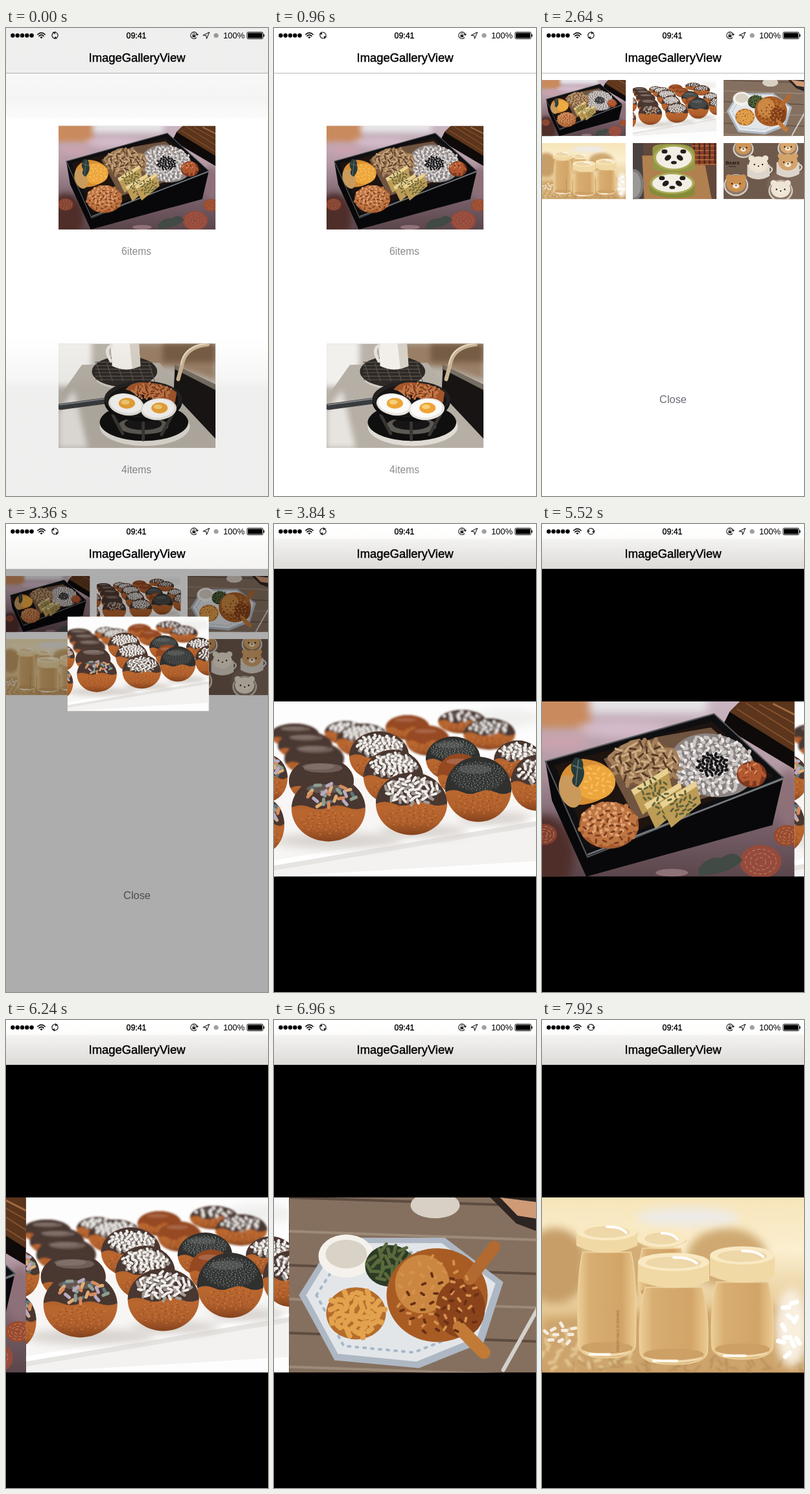
These frames come from a looping animation (404x720 px, 8 s). An HTML page:

```html
<!DOCTYPE html>
<html lang="en">
<head>
<meta charset="utf-8">
<title>ImageGalleryView</title>
<style>
html, body { margin: 0; width: 100%; height: 100%; overflow: hidden; background: #fff; }
svg { display: block; width: 100%; height: 100%; }
text { font-family: "Liberation Sans", Arial, sans-serif; text-anchor: middle; }
</style>
</head>
<body>
<svg id="stage" viewBox="0 0 404 720"></svg>
<script>
const LOOP = 8000, W = 404, H = 269;
let seed = 7;
const rnd = () => (seed = (seed * 16807) % 2147483647) / 2147483647;
const n1 = v => Math.round(v * 10) / 10;

// Shape helpers
const E = (x, y, rx, ry, fill, more = '') =>
  `<ellipse cx="${x}" cy="${y}" rx="${rx}" ry="${ry}" fill="${fill}" ${more}/>`;
const R = (x, y, w, h, fill, more = '') =>
  `<rect x="${x}" y="${y}" width="${w}" height="${h}" fill="${fill}" ${more}/>`;
const P = (d, fill, more = '') => `<path d="${d}" fill="${fill}" ${more}/>`;
const L = (d, stroke, w = 1, more = '') =>
  `<path d="${d}" fill="none" stroke="${stroke}" stroke-width="${w}" stroke-linecap="round" ${more}/>`;
const T = (x, y, size, text, fill = '#000', more = '') =>
  `<text x="${x}" y="${y}" font-size="${size}" fill="${fill}" ${more}>${text}</text>`;
const soft = 'filter="url(#soft)"';
const haze = s => `<g filter="url(#haze)">${s}</g>`;
const turn = (a, x, y) => `transform="rotate(${a} ${x} ${y})"`;
const grad = (id, stops, dir = 'x2="0" y2="1"') => `<linearGradient id="${id}" ${dir}>` +
  stops.map(([o, c, a = 1]) => `<stop offset="${o}" stop-color="${c}" stop-opacity="${a}"/>`).join('') +
  '</linearGradient>';

// Short strokes spread over an ellipse along a jittered spiral
function specks(n, cx, cy, rx, ry, len, color, w) {
  let d = '';
  const turn0 = rnd() * 6.283;
  for (let i = 0; i < n; i++) {
    const a = turn0 + i * 2.4, r = Math.sqrt((i + rnd()) / n), b = rnd() * 6.283;
    const u = Math.cos(b) * len, v = Math.sin(b) * len;
    d += `M${n1(cx + Math.cos(a) * r * rx - u / 2)} ${n1(cy + Math.sin(a) * r * ry - v / 2)}l${n1(u)} ${n1(v)}`;
  }
  return L(d, color, w);
}

function donut(x, y, rx, ry, cap, h = 0) {
  let s = E(x, y, rx, ry, 'url(#dough)') +
    specks(rx, x, y + ry * .45, rx * .75, ry * .42, 2.5, '#974a20', 1.1) +
    specks(rx * .6, x, y + ry * .4, rx * .75, ry * .4, 2, '#d28248', 1.1);
  if (cap) {
    const k = rx * Math.sqrt(1 - h * h), b = y + h * ry, q = k / 2;
    s += P(`M${x - k} ${b}A${rx} ${ry} 0 ${h > 0 ? 1 : 0} 1 ${x + k} ${b}` +
      `q${-q / 2} 6 ${-q} 0t${-q} 0t${-q} 0t${-q} 0Z`, cap) +
      E(x - rx * .1, y - ry * .62, rx * .5, ry * .14, '#fff', 'opacity=".16"');
  }
  return s;
}

function bento() {
  let s = R(0, 0, W, H, 'url(#cloth)') +
    R(-10, -10, 100, 52, '#c98a5d', soft) + R(90, -15, 180, 32, '#e6e4e7', soft) +
    E(140, 42, 70, 12, '#d6bccb', soft) + E(45, 62, 40, 12, '#cba3ae', soft) +
    E(20, 235, 45, 60, '#4f2f2c', soft) + E(395, 150, 20, 45, '#8d6f78', soft);
  const flower = (x, y, r, c) => E(x, y, r, r * .8, c) +
    [.75, .5, .25].map(k => E(x, y, r * k, r * .8 * k, 'none', 'stroke="#b98368" stroke-width="1" stroke-dasharray="5 3"')).join('');
  s += flower(18, 204, 20, '#84402f') + flower(352, 246, 32, '#964a3b') + flower(392, 206, 20, '#9a4a2d') +
    P('M256 258q10-20 36-18q20-14 32 4q-12 12-30 18l-36 7z', '#414a45') + E(215, 263, 25, 6, '#8f7178');
  s += P('M293 38L304 16L318 2H404V104Z', '#0d0a09') + P('M304 16L320 0H404V78Z', '#5b351c') +
    L('M330 3L404 50M350 4L404 34M316 12L402 66', '#84512c', 2) + L('M372 4L404 20', '#a06a40', 3);
  s += P('M20 92L30 152L83 269L370 190L387 117L85 239Z', '#08080a') +
    P('M20 92L280 19L387 117L85 239Z', '#0f0f11', 'stroke="#55585b" stroke-width="2" stroke-linejoin="round"') +
    P('M34 98L276 31L371 115L91 226Z', '#1e1410') +
    L('M86 235L386 119', '#777c80', 2.5);
  s += P('M110 88L190 55L275 40L355 108L330 128L160 182Z', '#6f5440') +
    E(278, 98, 66, 48, '#8d8583', turn(12, 278, 98)) + specks(120, 278, 98, 64, 46, 4, '#cbc6c4', 5.5) +
    specks(60, 278, 98, 62, 44, 3.5, '#efedec', 4) + specks(60, 278, 98, 62, 44, 3, '#77706e', 2) +
    specks(40, 278, 97, 24, 18, 3, '#17161a', 4);
  s += E(172, 95, 54, 36, '#7a583c') + specks(70, 172, 94, 54, 34, 12, '#a47f5a', 6) +
    specks(40, 172, 92, 50, 30, 10, '#cbab82', 3.5) + specks(26, 172, 95, 50, 30, 9, '#553926', 3);
  s += P('M42 122q4-26 36-34q42 4 50 32q-4 30-46 38q-28 6-40-36z', '#d88f34') + E(96, 124, 32, 27, '#eda63c') +
    E(58, 138, 16, 26, '#c99a5c', turn(-20, 58, 138)) + specks(20, 98, 122, 26, 22, 5, '#f8bf60', 2.5) +
    P('M66 86q14 0 12 15q6 14-8 31q-14-6-6-18q-10-14 2-28z', '#273b3b') + L('M71 90l-4 38M62 98l14 5', '#64796f', 1.5);
  s += E(118, 190, 46, 36, '#a35a30') + specks(80, 118, 189, 44, 33, 4, '#bf7642', 7) +
    specks(40, 114, 182, 38, 27, 3, '#dfa373', 4.5) + specks(30, 120, 194, 40, 28, 5, '#7f3d20', 3);
  const egg = (x, y) => `<g transform="translate(${x} ${y})">` +
    P('M0 34L56 0L64 34L18 72Z', '#bd9c56') + P('M0 34L56 0L58 8L5 42Z', '#e9d193') +
    specks(22, 35, 35, 22, 20, 5, '#5f6138', 3) + '</g>';
  s += egg(152, 102) + egg(172, 124) + egg(196, 122);
  return s + E(338, 112, 23, 20, '#7d3822') + specks(24, 338, 110, 20, 16, 7, '#b4592f', 5) + specks(6, 334, 104, 15, 10, 5, '#dc9270', 2);
}

function donuts() {
  const choc = '#493731', white = '#f0eeeb';
  const iced = (x, y, rx, ry, n, len = 3) => donut(x, y, rx, ry, choc) +
    specks(n, x + 1, y - ry * .42 + 1, rx * .78, ry * .44, len, '#a39a94', 4.5) +
    specks(n, x, y - ry * .45, rx * .76, ry * .42, len, white, 4);
  const poppy = (x, y, rx, ry) => donut(x, y, rx, ry, '#30302f', .08) +
    specks(rx * 5, x, y - ry * .4, rx * .83, ry * .46, 1, '#535c5a', 1.5) +
    specks(rx * 2, x, y - ry * .42, rx * .8, ry * .44, .6, '#9ba19d', 1);
  const party = (x, y, rx, ry) => donut(x, y, rx, ry, choc, -.05) +
    ['#5d7582', '#dcae78', '#8f9f8f', '#d98a5b', '#b9abc2'].map(c =>
      specks(5, x, y - ry * .45, rx * .74, ry * .36, 8, c, 5)).join('');
  const plain = (x, y, rx, ry) => donut(x, y, rx, ry, '#964821', .1);
  const glossy = (x, y, rx, ry) => donut(x, y, rx, ry, choc, .3) +
    E(x + rx * .05, y - ry * .55, rx * .6, ry * .2, '#a08d86', 'opacity=".45"');
  let s = R(0, 0, W, H, '#fdfdfd') + E(360, 25, 50, 16, '#f0f0ef', soft) +
    P('M0 130L404 90V182L0 250Z', '#f7f6f4') + P('M0 244L404 178V184L0 252Z', '#fff') +
    P('M0 252L404 184V192L0 260Z', '#e6e4e1') + P('M0 260L404 192V245L0 269Z', '#f3f2f1') +
    E(100, 214, 100, 12, '#d8d3cf', soft) + E(230, 200, 70, 10, '#d8d3cf', soft) + E(340, 180, 55, 10, '#d8d3cf', soft);
  s += haze(iced(290, 31, 37, 18, 14, 1) + iced(332, 50, 40, 24, 22, 1) + plain(206, 40, 34, 19) + plain(237, 60, 34, 23) +
    iced(110, 48, 32, 18, 24, 1) + iced(138, 60, 42, 26, 45, 1) +
    glossy(32, 52, 38, 18) + glossy(48, 68, 42, 22) + glossy(62, 88, 46, 26));
  s += iced(376, 90, 37, 30, 32, 2) + iced(405, 125, 40, 43, 32, 3) + poppy(276, 88, 42, 34) + plain(286, 112, 34, 32) + poppy(315, 135, 51, 50);
  return s + iced(162, 84, 46, 38, 55, 2) + iced(184, 116, 46, 42, 50, 3) + glossy(73, 122, 50, 36) +
    party(-10, 118, 31, 36) + party(-16, 190, 32, 42) + party(84, 165, 57, 50) + iced(212, 157, 55, 48, 38, 6);
}

function chicken() {
  let s = R(0, 0, W, H, '#85705f');
  for (let i = 0; i < 6; i++) s += L(`M0 ${i * 52}L404 ${i * 52 + 14}`, i % 2 ? '#9d8a78' : '#5e4c40', 4);
  return s + E(225, 12, 38, 20, '#d8d0c4') + P('M310 0H404V60L350 40Z', '#2d2522') + P('M325 0L404 10V36L352 28Z', '#cf9b76') +
    P('M15 150L70 62L240 62L330 130L300 222L200 262L70 250Z', '#aeb8c4') +
    P('M26 150L75 70L235 70L318 132L290 214L196 252L75 240Z', '#e3e6e9') +
    L('M42 150L84 84L230 84L302 135L276 205L192 238L84 228Z', '#a7b7ca', 4, 'stroke-dasharray="3 9"') +
    E(88, 90, 43, 33, '#f5f2ed') + E(88, 87, 32, 22, '#d9d2c6') +
    E(155, 105, 38, 32, '#2c3a26') + specks(26, 155, 102, 34, 28, 13, '#596a3c', 5) +
    E(103, 178, 46, 40, '#b56c2a') + specks(45, 103, 178, 42, 36, 7, '#e2a24e', 8) +
    E(228, 150, 78, 72, '#a85c24') + E(205, 133, 42, 45, '#cb8741') + E(264, 170, 38, 45, '#8a431b') +
    L('M278 125L316 76', '#b26a30', 19) + L('M262 200L300 238', '#c27a37', 20) +
    specks(45, 225, 148, 65, 58, 5, '#d4924d', 4) + specks(28, 235, 165, 62, 50, 5, '#693013', 4) +
    L('M330 265L392 155', '#d4d1cc', 6);
}

function pudding() {
  const jar = (x, y, w, b, lid) => {
    const c = x + w / 2, k = w * .08;
    return P(`M${x + k} ${y + lid}Q${x - 3} ${y + lid + 35} ${x} ${b - 18}Q${x + 4} ${b} ${c} ${b}` +
      `Q${x + w - 4} ${b} ${x + w} ${b - 18}Q${x + w + 3} ${y + lid + 35} ${x + w - k} ${y + lid}Z`,
      'url(#jar)', 'stroke="#ecd09a" stroke-width="2"') +
      E(c, b - 11, w * .42, 9, '#f0d9ac') + E(c, b - 15, w * .45, 9, '#cda066') + L(`M${c - w * .3} ${b - 5}h${w * .35}`, '#fffaf0', 4) +
      P(`M${x - 3} ${y + 12}v${lid - 22}Q${c} ${y + lid + 12} ${x + w + 3} ${y + lid - 10}v${22 - lid}Z`, '#f1d9a5') +
      E(c, y + 12, w / 2 + 3, 14, '#f9e9c3') + E(c, y + 13, w / 2 - 9, 9, '#eed7a8') +
      L(`M${c} ${y + 5}q${w * .25} 0 ${w * .34} 9`, '#fff', 4);
  };
  return R(0, 0, W, H, 'url(#cream)') + E(20, 105, 52, 58, '#c79e68', soft) + E(120, 105, 60, 48, '#d3ad75', soft) +
    E(285, 92, 62, 45, '#cfa971', soft) + E(225, 30, 80, 14, '#edebe8', soft) +
    P('M0 185L404 165V269H0Z', '#cda46c', soft) +
    haze(specks(40, 60, 235, 90, 32, 8, '#e3c692', 5) + specks(40, 230, 257, 190, 12, 12, '#b9905c', 3)) +
    E(385, 200, 26, 60, '#f8efdf', soft) + specks(10, 382, 205, 16, 50, 9, '#fff', 7) + specks(10, 28, 210, 25, 18, 6, '#f4ece0', 5) +
    jar(149, 50, 71, 160, 28) + jar(56, 40, 88, 246, 44) + jar(262, 77, 94, 248, 53) + jar(151, 87, 104, 256, 51) +
    T(0, 0, 6, 'FRESH MILK PUDDING', '#8d6b43', 'transform="translate(119 205) rotate(-90)"');
}

function panda() {
  const face = (x, y, rx, ry) => E(x, y, rx, ry, '#a9aa55') + E(x, y, rx - 12, ry - 9, '#f3efe5') +
    E(x - rx * .46, y - ry * .48, 14, 10, '#231d1b') + E(x + rx * .46, y - ry * .48, 14, 10, '#231d1b') +
    E(x - rx * .3, y + 1, 17, 12, '#231d1b', turn(-35, x - rx * .3, y)) +
    E(x + rx * .3, y + 1, 17, 12, '#231d1b', turn(35, x + rx * .3, y)) +
    E(x, y + ry * .38, 14, 8, '#231d1b');
  let s = R(0, 0, W, H, '#62483a') + R(0, 0, 50, H, '#494241') + P('M45 60H340L380 269H55Z', '#b1804f') + R(285, 0, 119, 105, '#8b3d27');
  for (let i = 0; i < 5; i++) s += R(292 + i * 25, 0, 7, 105, '#3c2722') + R(285, 12 + i * 22, 119, 4, '#c27c42');
  return s + E(5, 200, 48, 75, '#7c7a79') + E(3, 200, 36, 62, '#9b9997') +
    P('M95 25Q100 0 195 5Q292 0 300 50V125Q200 160 96 125Z', '#939746') + face(198, 70, 98, 62) +
    P('M82 195V238Q170 282 298 250V190Z', '#858b37') + face(190, 193, 108, 52);
}

function bears() {
  const bear = (x, y, r, fur, cup) => (cup ? P(`M${x - r - 8} ${y}v${r * 1.2}q${r + 8} ${r * .7} ${2 * r + 16} 0v${-r * 1.2}Z`, '#ddd5cb') +
    L(`M${x + r + 8} ${y + 10}q24 12 0 30`, '#ddd5cb', 7) : E(x, y + 7, r + 12, r + 5, '#d8d0c5') + E(x, y + 5, r + 5, r, '#8c7868')) +
    E(x - r * .72, y - r * .65, r * .32, r * .3, fur) + E(x + r * .72, y - r * .65, r * .32, r * .3, fur) +
    E(x, y, r, r * .85, fur) + E(x, y + r * .25, r * .33, r * .24, '#f5e9d7') +
    E(x - r * .42, y, 3.5, 4, '#2a1c16') + E(x + r * .42, y, 3.5, 4, '#2a1c16') + E(x, y + r * .17, 4, 3, '#2a1c16');
  return R(0, 0, W, H, '#6e5a4d') + E(330, 200, 120, 80, '#7d685a', soft) +
    bear(95, 22, 38, '#cc9459') + bear(310, 18, 38, '#d9a76c') + bear(168, 103, 46, '#eee3d2', 1) +
    bear(310, 92, 47, '#d4a36c', 1) + bear(60, 195, 47, '#cb8f50') + bear(275, 222, 47, '#efe5d6') +
    T(43, 102, 24, 'Bears', '#1b1411', 'font-weight="bold"') + T(43, 114, 11, 'bakery', '#1b1411');
}

function eggs() {
  const fried = (x, y, a) => E(x, y, 46, 28, '#e8e4df', turn(a, x, y)) +
    E(x - 1, y - 2, 41, 24, '#fbfaf8', turn(a, x, y)) + E(x + 2, y - 3, 21, 14, '#eda437') + E(x - 2, y - 6, 11, 6, '#f8cf78');
  let s = R(0, 0, W, H, '#b9b3aa') + R(-10, -10, 95, 120, '#f2f0ed', soft) + P('M190 0H404V92L305 62L190 52Z', '#9a7f66', soft) +
    R(268, 0, 136, 48, '#765b45', soft) + P('M0 140L60 55L260 50L404 235V269H0Z', '#b6afa6') +
    P('M0 175L40 120L75 269H0Z', '#e7e4df', soft) + P('M300 55L404 110V245L296 130Z', '#171413') + P('M300 55L404 105V120L300 66Z', '#766d63');
  s += E(170, 78, 82, 40, '#d1cbc3') + E(170, 72, 84, 40, '#2e2926');
  for (let i = 0; i < 6; i++) s += L(`M${98 + i * 27} 52l14 45M95 ${48 + i * 9}h145`, '#5d564f', 2);
  s += P('M134 0H207L211 58Q174 76 138 58Z', '#f2efea') + P('M183 0H207L211 58L190 65Z', '#d6d0c7') + L('M136 5Q116 15 135 45', '#e6e1da', 8) +
    L('M384 2Q325 8 318 55L308 92', '#c9b596', 10) + L('M382 0Q322 6 315 54', '#e9dcc6', 3);
  s += E(222, 214, 116, 50, '#e0dcd5') + E(220, 203, 114, 48, '#100f0f') + E(218, 212, 65, 22, '#5d5954') + E(218, 207, 48, 16, '#171515') +
    L('M140 185L165 232M292 185L265 235M218 190V248', '#393634', 8) +
    L('M5 163L124 147', '#3a3b3e', 16) + L('M3 158L122 142', '#85888b', 3) +
    E(218, 151, 100, 50, '#0e0e0f') + E(218, 143, 100, 47, '#232121') + E(218, 147, 91, 41, '#161414');
  s += P('M172 118Q190 97 220 100Q270 100 304 126L300 152Q260 150 222 134Z', '#a4562b') +
    specks(50, 240, 123, 49, 18, 9, '#c47a49', 5) + specks(22, 240, 122, 47, 17, 8, '#753318', 3);
  return s + fried(174, 157, 10) + fried(258, 169, -5);
}

const photos = { bento, donuts, chicken, pudding, panda, bears, eggs };
const pages = Object.keys(photos).slice(0, 6);
const cell = i => [(i % 3) * 140, 80 + Math.floor(i / 3) * 97, 129.3, 86.3];
const LIST = [81, 150.5, 242, 159.5], FULL = [0, 273, W, H + .5];
const use = (name, id) => `<use id="${id}" href="#${name}"/>`;

const bar = R(0, 0, W, 69, '#fff') + R(0, 0, W, 69, 'url(#bar)', 'id="dim"') + R(0, 69, W, 1, '#b9b9b9', 'id="line"') +
  [0, 1, 2, 3, 4].map(i => E(10.4 + i * 7.3, 11.5, 3.2, 3.2, '#000')).join('') +
  L('M48.8 10Q54.5 4.6 60.2 10M50.9 12.3Q54.5 8.9 58.1 12.3', '#000', 1.6) + P('M54.5 16.3l-2.2-2.3q2.2-1.7 4.4 0z', '#000') +
  '<g id="sync">' + [0, 180].map(a => `<g transform="rotate(${a})">` +
    L('M-4.4 1.4A4.6 4.6 0 0 1 2.2-4', '#222', 1.2) + P('M1.2-6.2L5.6-2.6L.8-1.4Z', '#222') + '</g>').join('') + '</g>' +
  T(201, 16, 12.4, '09:41', '#000', 'stroke="#000" stroke-width=".35"') +
  L('M294.6 9.2A5.2 5.2 0 1 0 293.6 15', '#222', 1.1) + P('M292.4 9h4.6l-2.3 3.2z', '#222') + R(287.4, 10.6, 4.8, 3.7, '#222') +
  L('M288.4 10.5v-1a1.4 1.4 0 0 1 2.8 0v1', '#222', .9) +
  L('M304 11.2L313.6 6.6L309.4 16.4L308.7 11.8Z', '#222', 1.1, 'stroke-linejoin="round"') +
  E(324, 11.5, 3.6, 3.6, '#a0a0a0') + T(351.5, 16.2, 13, '100%') +
  R(371.8, 6.3, 24.4, 10.4, 'none', 'rx="1.6" stroke="#000" stroke-width=".9"') + R(373, 7.5, 22, 8, '#000') + R(397, 9.5, 1.4, 4, '#000') +
  T(202, 52, 18.4, 'ImageGalleryView', '#000', 'stroke="#000" stroke-width=".45"');

document.getElementById('stage').innerHTML = '<defs>' +
  '<filter id="soft" x="-30%" y="-50%" width="160%" height="200%"><feGaussianBlur stdDeviation="7"/></filter>' +
  '<filter id="haze"><feGaussianBlur stdDeviation="1.6"/></filter>' +
  grad('cloth', [[0, '#c9b6c2'], [.35, '#b59aa5'], [.7, '#78606a'], [1, '#5b464b']]) +
  grad('dough', [[0, '#84441f'], [.55, '#ba672f'], [.8, '#b0602c'], [1, '#84421c']]) +
  grad('cream', [[0, '#f7e5b9'], [.3, '#fbefd0'], [.7, '#e2c28a'], [1, '#c79c62']]) +
  grad('jar', [[0, '#ecce97'], [.2, '#d8ae72'], [.75, '#d2a468'], [1, '#ebcb92']], '') +
  grad('bar', [[0, '#fff'], [.3, '#fdfdfc'], [.36, '#f3f2f0'], [1, '#dddbd8']]) +
  grad('tint', [[0, '#181810', .07], [.097, '#181810', .07], [.098, '#181810', .03], [.15, '#181810', .045], [.19, '#181810', .02],
    [.195, '#181810', 0], [.66, '#181810', 0], [.75, '#181810', .04], [.77, '#181810', .07], [1, '#181810', .07]]) +
  Object.entries(photos).map(([id, draw]) =>
    `<symbol id="${id}" viewBox="0 0 ${W} ${H}" preserveAspectRatio="none">${draw()}</symbol>`).join('') + '</defs>' +
  R(0, 0, W, 720, '#fff') +
  '<g id="list"><use href="#eggs" x="81" y="485.5" width="242" height="160.5"/>' +
  T(201, 349, 15.6, '6items', '#8b8b8e') + T(201, 685, 15.6, '4items', '#8b8b8e') + '</g>' +
  '<g id="grid">' + pages.map((p, i) => use(p, 'cell' + i)).reverse().join('') + T(202, 577, 16.4, 'Close', '#686e76', 'id="close"') + '</g>' +
  R(0, 0, W, 720, '#000', 'id="black"') + pages.map((p, i) => use(p, 'page' + i)).join('') +
  bar + R(0, 0, W, 720, 'url(#tint)', 'id="shade"');

const $ = id => document.getElementById(id);
const ramp = (t, from, dur) => Math.min(1, Math.max(0, (t - from) / dur));
const easeOut = u => 1 - (1 - u) ** 3;
const easeInOut = u => u * u * (3 - 2 * u);
const mix = (a, b, k) => a.map((v, i) => v + (b[i] - v) * k);
const show = (el, on) => el.setAttribute('display', on ? 'inline' : 'none');
const fade = (id, v) => { show($(id), v > 0); $(id).setAttribute('opacity', v); };
function place(el, r) {
  ['x', 'y', 'width', 'height'].forEach((k, i) => el.setAttribute(k, r[i]));
}

function render(t) {
  const open = easeInOut(ramp(t, 1560, 600));
  const zoom = easeOut(ramp(t, 3300, 500));
  const swipe = from => easeOut(ramp(t, from, 720));
  const page = 1 - swipe(5040) + swipe(5826) + swipe(6520) + swipe(7195);

  fade('shade', 1 - ramp(t, 200, 500));
  fade('list', 1 - ramp(open, 0, .6));
  fade('close', open);
  fade('black', zoom);
  fade('dim', zoom);
  fade('line', 1 - zoom);
  show($('grid'), zoom < 1);
  pages.forEach((_, i) => {
    place($('cell' + i), mix(LIST, cell(i), open));
    show($('cell' + i), i === 0 || open > 0);
    const el = $('page' + i);
    const x = (i - page) * W;
    show(el, zoom > 0 && (zoom < 1 ? i === 1 : Math.abs(x) < W));
    place(el, zoom < 1 ? mix(cell(i), FULL, zoom) : [x, ...FULL.slice(1)]);
  });
  $('sync').setAttribute('transform', `translate(75.5 11.3) rotate(${t * .15 + 135})`);
}

const start = performance.now();
function tick(now) {
  render(Math.max(0, now - start) % LOOP);
  requestAnimationFrame(tick);
}
render(0);
requestAnimationFrame(tick);
</script>
</body>
</html>
```
